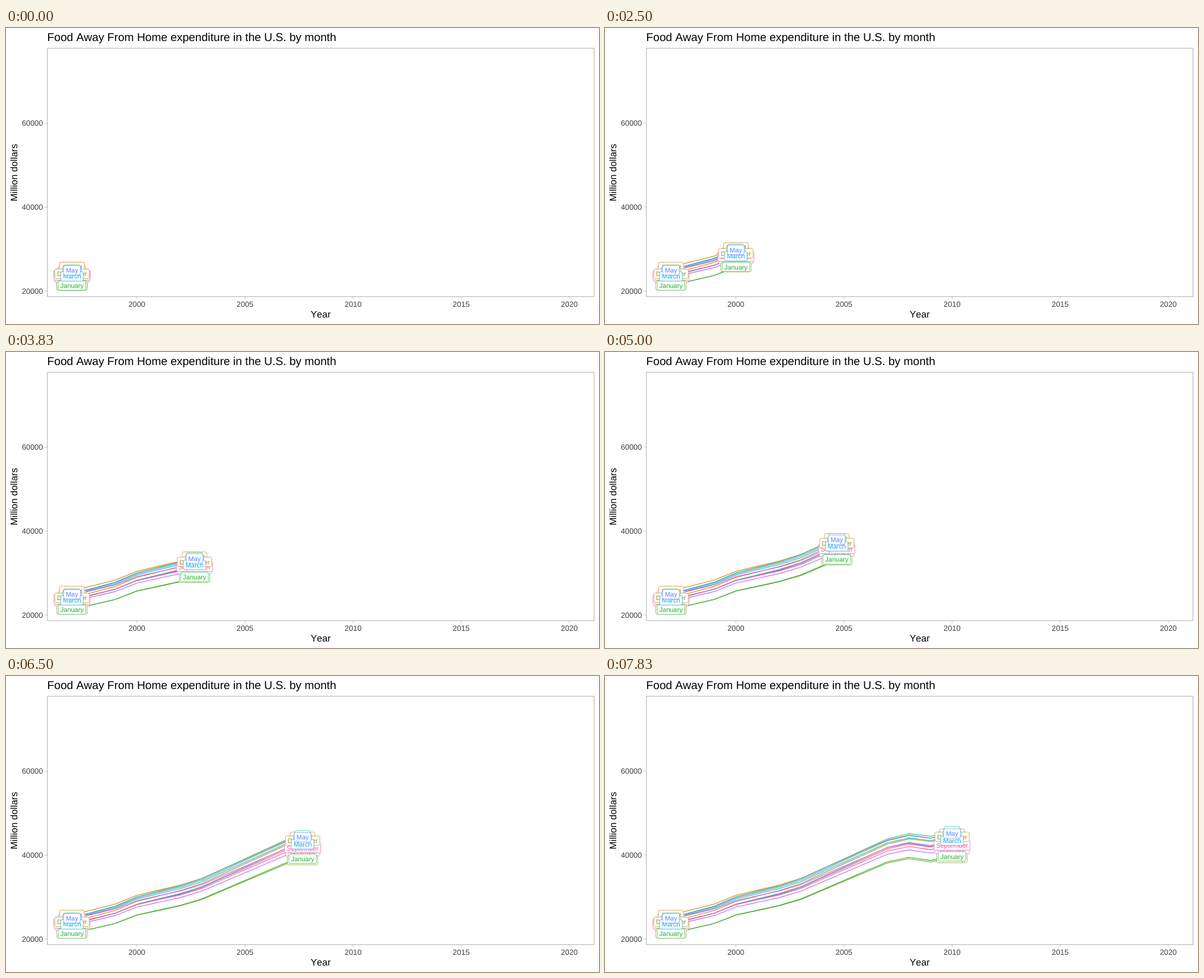
Write an HTML page that moves like this. It is 1000 by 500 pixels and loops after 8000 ms.

```html
<!DOCTYPE html>
<html lang="en">
<head>
<meta charset="utf-8">
<title>Food Away From Home expenditure</title>
<style>
  html, body { margin: 0; width: 100%; height: 100%; overflow: hidden; background: #fff; }
  svg { display: block; width: 100vw; height: 100vh; }
  text {
    font-family: "Liberation Sans", Arial, Helvetica, sans-serif;
    font-kerning: none;
    text-rendering: geometricPrecision;
  }
  .tick { font-size: 12.8px; fill: #404040; }
  .axis { font-size: 16px; }
  .label { font-size: 11px; text-anchor: middle; }
</style>
</head>
<body>
<svg id="chart" viewBox="0 0 1000 500"></svg>
<script>
const LOOP = 8000, FPS = 6, LAST = 47;
const FIRST_YEAR = 1997, SPAN = 23, HOLD = 5, STEPS = 74;
const svg = document.getElementById('chart');

const xOf = year => 220.7 + (year - 2000) * 36.46;
const yOf = value => 444.3 - (value - 20000) * 0.0070875;
const mix = (a, b, t) => a + (b - a) * t;

// Average month: the years where the trend bends
const trend = [
  [1997, 23850], [1999, 26400], [2000, 28500], [2002, 30900], [2003, 32500],
  [2007, 41600], [2008, 42750], [2009, 42050], [2010, 43100]
];

// Alphabetical; gap = distance from the trend in 1997 and in 2010
const months = [
  { name: 'April', color: '#f35e5a', gap: [-300, -100] },
  { name: 'August', color: '#d57b05', gap: [1900, 2000] },
  { name: 'December', color: '#a98f0b', gap: [250, 1250] },
  { name: 'February', color: '#6fa20d', gap: [-2500, -3800] },
  { name: 'January', color: '#24ae2f', gap: [-2550, -3400] },
  { name: 'July', color: '#1cb57c', gap: [1250, 2550] },
  { name: 'June', color: '#17b3b7', gap: [900, 1450] },
  { name: 'March', color: '#10a5ea', gap: [-350, 350] },
  { name: 'May', color: '#5086ff', gap: [1100, 2050] },
  { name: 'November', color: '#bd66ff', gap: [-650, -1650] },
  { name: 'October', color: '#f34bdc', gap: [900, -50] },
  { name: 'September', color: '#ff4d9d', gap: [-150, -800] }
];

// Labels stack by month number sorted as text: 1, 10, 11, 12, 2, ...
const stack = months.map((m, i) => String(i + 1)).sort().map(n => months[n - 1]);

function trendAt(year) {
  const i = Math.max(1, trend.findIndex(key => key[0] >= year));
  const [y0, v0] = trend[i - 1], [y1, v1] = trend[i];
  return mix(v0, v1, (year - y0) / (y1 - y0));
}

function monthAt(month, year) {
  const whole = Math.floor(year);
  const at = y => trendAt(y) + mix(...month.gap, (y - FIRST_YEAR) / 13);
  return year === whole ? at(year) : mix(at(whole), at(whole + 1), year - whole);
}

function add(tag, attrs, parent = svg, content = '') {
  const el = document.createElementNS('http://www.w3.org/2000/svg', tag);
  for (const key in attrs) el.setAttribute(key, attrs[key]);
  el.textContent = content;
  parent.appendChild(el);
  return el;
}

function tick(x1, y1, x2, y2) {
  add('line', { x1, y1, x2, y2, stroke: '#b3b3b3', 'stroke-width': 0.8 });
}

function drawAxes() {
  add('text', { x: 69.5, y: 22, 'font-size': 19.2 }, svg, 'Food Away From Home expenditure in the U.S. by month');
  add('text', { class: 'axis', x: 530.6, y: 489, 'text-anchor': 'middle' }, svg, 'Year');
  add('text', { class: 'axis', transform: 'translate(19.3 244.3) rotate(-90)', 'text-anchor': 'middle' }, svg, 'Million dollars');
  for (const value of [20000, 40000, 60000]) {
    const y = yOf(value);
    tick(65.8, y, 69.8, y);
    add('text', { class: 'tick', x: 62.3, y: y + 4.6, 'text-anchor': 'end' }, svg, value);
  }
  for (let year = 2000; year <= 2020; year += 5) {
    const x = xOf(year);
    tick(x, 453.7, x, 457.7);
    add('text', { class: 'tick', x, y: 471, 'text-anchor': 'middle' }, svg, year);
  }
  add('rect', { x: 69.8, y: 34.2, width: 921.8, height: 419.5, fill: 'none', stroke: '#b3b3b3', 'stroke-width': 1.07 });
}

function makeLabel({ name, color }) {
  const g = add('g', {});
  const box = add('rect', { y: -8, height: 16, rx: 2.2, fill: '#fff', stroke: color, 'stroke-width': 0.65 }, g);
  const text = add('text', { class: 'label', y: 4, fill: color }, g, name);
  const w = text.getComputedTextLength() + 7.3;
  box.setAttribute('x', -w / 2);
  box.setAttribute('width', w);
  return g;
}

function place(label, month, year) {
  const x = xOf(year), y = yOf(monthAt(month, year));
  label.setAttribute('transform', `translate(${x.toFixed(2)} ${y.toFixed(2)})`);
}

// Each year begins on a whole step, so years take three or four steps
const keyStep = i => HOLD + Math.round(i * STEPS / SPAN);

function yearAt(step) {
  if (step <= HOLD) return FIRST_YEAR;
  let i = 0;
  while (keyStep(i + 1) <= step) i++;
  return FIRST_YEAR + i + (step - keyStep(i)) / (keyStep(i + 1) - keyStep(i));
}

drawAxes();
for (const m of months) {
  m.line = add('polyline', { fill: 'none', stroke: m.color, 'stroke-width': 1.07 });
}
for (const m of stack) place(makeLabel(m), m, FIRST_YEAR);
for (const m of stack) m.tag = makeLabel(m);

let shown = -1;

function render(time) {
  const step = Math.min(LAST, Math.floor((time % LOOP + 4) * FPS / 1000));
  if (step === shown) return;
  shown = step;
  const now = yearAt(step);
  const years = [];
  for (let y = FIRST_YEAR; y < now; y++) years.push(y);
  years.push(now);
  for (const m of months) {
    const points = years.map(y => `${xOf(y).toFixed(2)},${yOf(monthAt(m, y)).toFixed(2)}`);
    m.line.setAttribute('points', points.join(' '));
    place(m.tag, m, now);
  }
}

const start = performance.now();
function loop() {
  render(performance.now() - start);
  requestAnimationFrame(loop);
}
loop();
</script>
</body>
</html>
```
